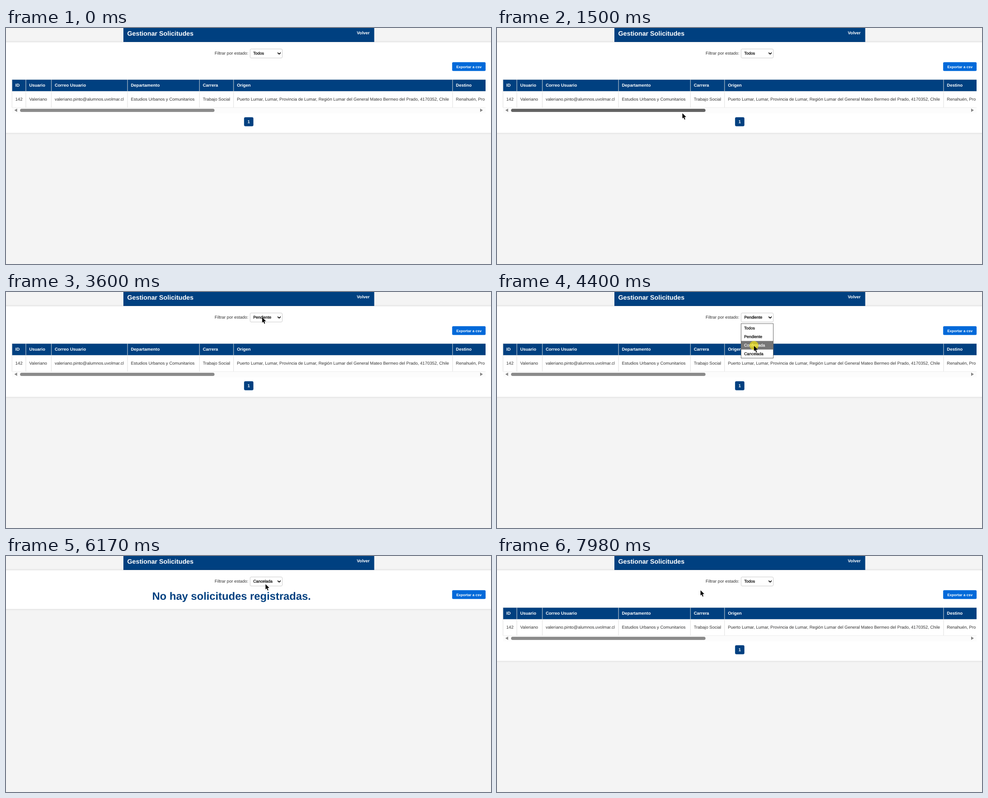
Write an HTML page that moves like this. It is 1070 px wide and 523 px high and loops after 8000 ms.

```html
<!DOCTYPE html>
<html lang="es">
<head>
<meta charset="utf-8">
<title>Gestionar Solicitudes</title>
<style>
  html, body { margin: 0; width: 100%; height: 100%; overflow: hidden; background: #f4f4f4; }
  svg {
    display: block; width: 1070px; height: 523px;
    font: 9.48px "Liberation Sans", Arial, sans-serif;
    text-rendering: geometricPrecision;
  }
  text { white-space: pre; fill: #333; }
  .bold { font-weight: bold; }
  .white { fill: #fff; }
  .option { font-size: 8.89px; color: #000; fill: currentColor; stroke: currentColor; stroke-width: .25px; }
  #card { fill: #fff; filter: drop-shadow(0 0 2px rgba(0, 0, 0, .16)); }
</style>
</head>
<body>
<svg id="stage" viewBox="0 0 1070 523">
  <rect x="259" width="553.4" height="31" fill="#004080"/>
  <text class="bold white" x="267.5" y="17.3" font-size="14.22">Gestionar Solicitudes</text>
  <text class="bold white" x="774" y="14.2">Volver</text>
  <rect id="card" x="-10" y="31.5" width="1090"/>
  <text x="460.3" y="59.4">Filtrar por estado:</text>
  <rect x="538.5" y="46.5" width="71" height="20" rx="2.5" fill="#fff" stroke="#ccc"/>
  <text id="value" class="option" x="545.4" y="59.4"></text>
  <path d="M599.3 54.6L602.6 57.9L605.9 54.6" fill="none" stroke="#000" stroke-width="1.6"/>
  <rect x="984.3" y="75.8" width="73.8" height="19.5" rx="2.5" fill="#0069d9"/>
  <text class="bold white" x="993.4" y="88.5" font-size="8.1">Exportar a csv</text>

  <g id="list">
    <clipPath id="clip"><rect x="12" y="113" width="1046" height="64"/></clipPath>
    <g id="table" clip-path="url(#clip)">
      <rect x="13" y="114.3" width="1050" height="26" fill="#004080"/>
      <rect id="row" x="13" y="140.3" width="1050" height="36"/>
      <path d="M13 114.3H1060M13 140.3H1060M13 176.3H1060" stroke="#ddd" stroke-width=".6"/>
    </g>
    <rect x="13" y="177" width="1045" height="12" fill="#fcfcfc"/>
    <rect id="thumb" x="31" y="179" width="429" height="7" rx="3.5"/>
    <path d="M24.5 178.5V186L18.5 182.3ZM1046 178.5V186L1052 182.3Z" fill="#858585"/>
    <rect x="525.2" y="197.7" width="20.6" height="20" rx="3" fill="#004080"/>
    <text class="bold white" x="535.5" y="211.3" text-anchor="middle">1</text>
  </g>

  <text id="empty" class="bold" x="322.5" y="97" style="font-size:23.7px;fill:#004080">No hay solicitudes registradas.</text>

  <g id="menu">
    <rect x="538.5" y="70" width="71" height="76.5" fill="#fff" stroke="#666"/>
    <rect id="mark" x="539" width="70" height="19" fill="#767676"/>
  </g>
  <g id="pointer">
    <circle id="click" cy="-1" r="10" fill="#fff000" opacity=".6"/>
    <path d="M0 0V11.5L2.6 9.2L4.6 14L6.4 13.2L4.5 8.5L8.3 8.2Z" fill="#000"/>
  </g>
</svg>
<script>
const LOOP = 8000, ROW_H = 19, MENU_TOP = 70, CELL_PAD = 7.4;
const $ = id => document.getElementById(id);
const options = ["Todos", "Pendiente", "Confirmada", "Cancelada"];

// [text left, heading, cell]
const columns = [
  [20.6, "ID", "142"],
  [51.2, "Usuario", "Valeriano"],
  [107.5, "Correo Usuario", "valeriano.pinto@alumnos.uvolmar.cl"],
  [275.5, "Departamento", "Estudios Urbanos y Comunitarios"],
  [434.2, "Carrera", "Trabajo Social"],
  [509.4, "Origen", "Puerto Lumar, Lumar, Provincia de Lumar, Región Lumar del General Mateo Bermeo del Prado, 4170352, Chile"],
  [992.6, "Destino", "Renahuén, Pro"]
];

// Each round opens the select at (x, y) and picks an option from its menu.
const rounds = [
  { open: 2720, pick: 3280, option: 1, x: 566, y: 58 },
  { open: 3800, pick: 4400, option: 2, x: 565, y: 53 },
  { open: 4930, pick: 5850, option: 3, x: 557, y: 60 },
  { open: 6300, pick: 7630, option: 0, x: 573, y: 60 }
];

// Pointer moves: start, end, destination; it rests in between.
const wander = [
  [30, 330, 334, 127], [330, 540, 591, 120], [540, 680, 672, 174], [680, 910, 585, 177],
  [960, 1030, 570, 246], [1030, 1270, 373, 114], [1270, 1500, 409, 189], [1530, 1960, 418, 184]
];
const moves = [...wander];
let free = 2190;
for (const { open, pick, option, x, y } of rounds) {
  moves.push([free, open, x, y]);
  moves.push([open + 130, pick - 200, x + 2, MENU_TOP + (option + .5) * ROW_H + 2]);
  free = pick + 40;
}
moves.push([free, 7980, 449, 76]);

const easeOut = k => 1 - (1 - k) ** 3;
const within = (v, from, to) => v >= from && v < to;
const show = (el, on) => el.setAttribute("visibility", on ? "visible" : "hidden");

function add(parent, tag, attrs, label = "") {
  const el = document.createElementNS("http://www.w3.org/2000/svg", tag);
  for (const name in attrs) el.setAttribute(name, attrs[name]);
  el.textContent = label;
  return parent.appendChild(el);
}

for (const [x, heading, cell] of columns) {
  add($("table"), "path", { d: `M${x - CELL_PAD} 114V176`, stroke: "#ddd" });
  add($("table"), "text", { x, y: 130.4, class: "bold white" }, heading);
  add($("table"), "text", { x, y: 161.4 }, cell);
}
const items = options.map((name, i) =>
  add($("menu"), "text", { x: 545.2, y: 83 + i * ROW_H, class: "option" }, name));

function pointerAt(t) {
  let x = 300, y = 515;
  for (const [from, to, toX, toY] of moves) {
    if (t < from) break;
    const k = easeOut(Math.min(1, (t - from) / (to - from)));
    x += (toX - x) * k;
    y += (toY - y) * k;
  }
  return [x, y];
}

const choiceAt = t => rounds.reduce((choice, r) => t >= r.pick + 40 ? r.option : choice, 0);

function draw(t) {
  const [x, y] = pointerAt(t);
  const choice = choiceAt(t);
  const open = rounds.some(r => within(t, r.open + 50, r.pick + 40));
  const clicked = rounds.some(r => within(t, r.open, r.open + 180) || within(t, r.pick, r.pick + 180));
  const empty = choiceAt(t - 60) > 1;
  const hover = Math.floor((y - MENU_TOP) / ROW_H);
  const marked = hover in options ? hover : choice;

  show($("pointer"), t >= 30);
  $("pointer").setAttribute("transform", `translate(${x} ${y})`);
  $("click").style.display = clicked ? "" : "none";

  $("value").textContent = options[choice];
  show($("menu"), open);
  $("mark").setAttribute("y", MENU_TOP + .5 + marked * ROW_H);
  items.forEach((el, i) => el.style.color = i === marked ? "#fff" : "#000");

  show($("list"), !empty);
  show($("empty"), empty);
  $("card").setAttribute("height", empty ? 86 : 201);
  const overRow = !open && within(y, 140, 176);
  const overThumb = !open && within(x, 31, 460) && within(y, 177, 190);
  $("row").setAttribute("fill", overRow ? "#f1f1f1" : "#fff");
  $("thumb").setAttribute("fill", overThumb ? "#636363" : "#8b8b8b");
}

const start = performance.now();
function tick() {
  draw((performance.now() - start) % LOOP);
  requestAnimationFrame(tick);
}
tick();
</script>
</body>
</html>
```
